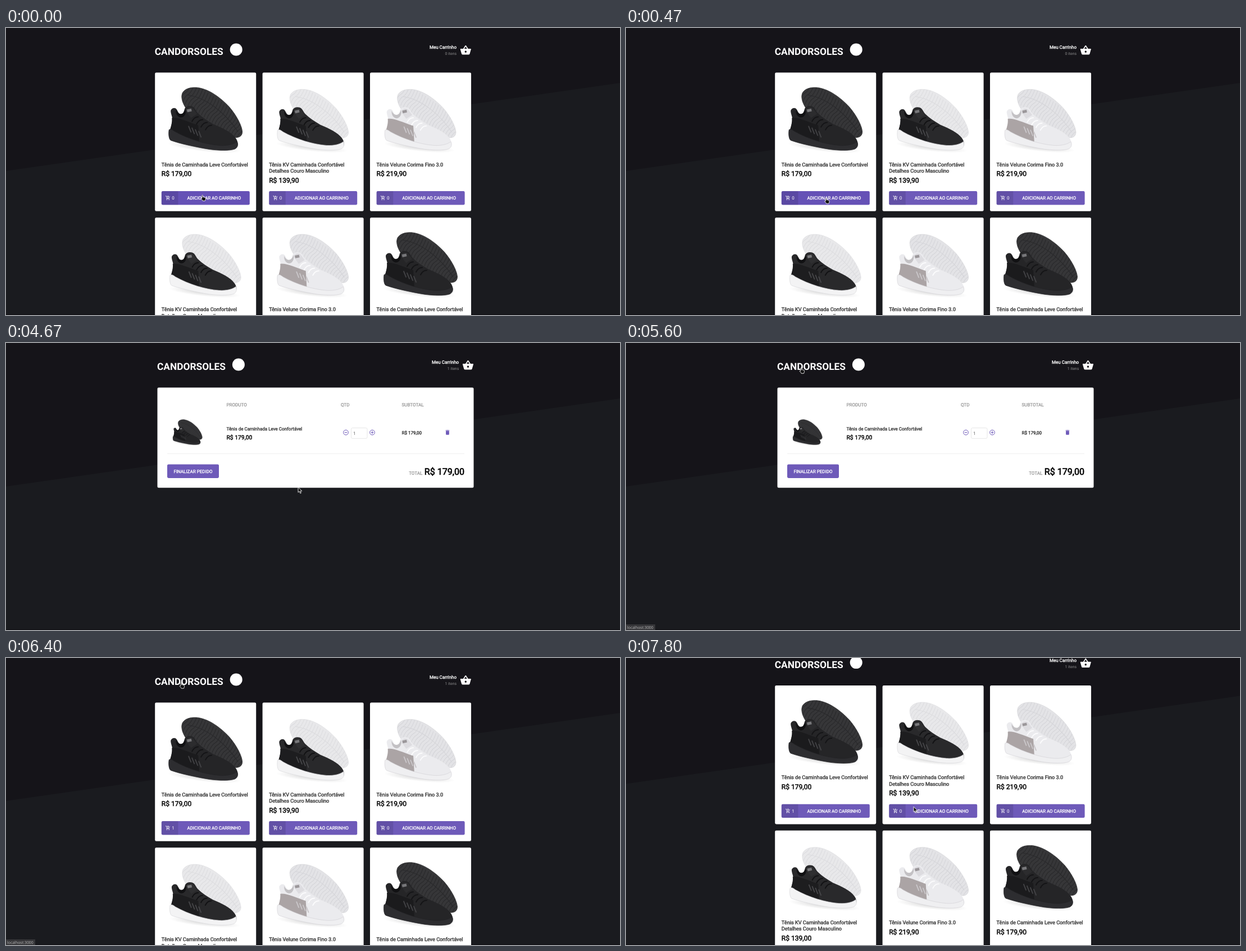
Recreate the animation shown at these times as an HTML page. Size 1093x512 px, loop 8000 ms.

```html
<!DOCTYPE html>
<html lang="pt-BR">
<head>
<meta charset="utf-8">
<title>Loja de tênis</title>
<style>
html, body { margin: 0; width: 100%; height: 100%; overflow: hidden; background: #1a1b1f; }
svg { display: block; width: 1093px; height: 512px; }
text { font-family: Roboto, Arial, sans-serif; text-rendering: geometricPrecision; white-space: pre; }
</style>
</head>
<body>
<svg id="stage" viewBox="0 0 1093 512" xmlns="http://www.w3.org/2000/svg"></svg>
<script>
const LOOP = 8000;
const PURPLE = '#6e5ab9', HOVER = '#6551b6';
const CARD = { x: 265.2, y: 79.5, w: 180, h: 247.3, dx: 191.4, dy: 258.7 };

const text = (x, y, str, size, fill, { bold = true, anchor = 'start', id = '' } = {}) =>
  `<text ${id && `id="${id}"`} x="${x}" y="${y}" font-size="${size}" fill="${fill}" text-anchor="${anchor}"` +
  (bold ? ` stroke="${fill}" stroke-width="${size * 0.04}"` : '') + `>${str}</text>`;

const rect = (x, y, w, h, fill, extra = '') =>
  `<rect x="${x}" y="${y}" width="${w}" height="${h}" fill="${fill}" ${extra}/>`;

const icon = (x, y, size, fill, d) =>
  `<path transform="translate(${x} ${y}) scale(${size / 24})" fill="${fill}" d="${d}"/>`;

const repeat = (n, fn) => Array.from({ length: n }, (_, i) => fn(i)).join('');

const ICONS = {
  basket: 'M17.2 9l-4.4-6.6a1 1 0 0 0-1.6 0L6.8 9H2a1 1 0 0 0-1 1.3l2.6 9.2A2 2 0 0 0 5.5 21h13a2 2 0 0 0 1.9-1.5L23 10.3A1 1 0 0 0 22 9zM9 9l3-4.4L15 9zm3 8a2 2 0 1 1 0-4 2 2 0 0 1 0 4z',
  add: 'M11 9h2V6h3V4h-3V1h-2v3H8v2h3zM7 18a2 2 0 1 0 0 4 2 2 0 0 0 0-4zm10 0a2 2 0 1 0 0 4 2 2 0 0 0 0-4zM7.2 14.8V14.6l.9-1.6h7.4a2 2 0 0 0 1.8-1l3.9-7L19.4 4 15.5 11h-7L4.3 2H1v2h2l3.6 7.6-1.4 2.4A2 2 0 0 0 7 17h12v-2H7.4z',
  trash: 'M6 19a2 2 0 0 0 2 2h8a2 2 0 0 0 2-2V7H6zM19 4h-3.5l-1-1h-5l-1 1H5v2h14z'
};

// Shoe outlines, in card coordinates
const SOLE = 'M54 62C48 52 46 43 49 36C54 28 65 25.5 77 27C97 30 117 45 132 61C145 76 155 95 155.5 106C155 116 146 118 134 114C105 105 70 85 54 62Z';
const UPPER = 'M28 68C29 64 34 62 37 64C40 66 41 73 46 75C50 75 52 68 53 64C56 59 64 58 69 62C72 65 73 69 76 72C84 80 94 86 104 92C120 99 136 106 143 116C147 121 148 126 147 130L140 134C110 136 60 126 26 106C28 97 31 90 31 84C31 78 28 74 28 68Z';
const QUARTER = 'M30 81C40 79 54 86 77 94L79 127C56 121 38 113 26 106C28 97 31 90 30 81Z';
const MIDSOLE = 'M25 102C28 100 31 102 35 105C60 119 90 128 115 130C130 131 142 127 146 123C149 129 147 134 142 136.5C132 140 112 139 97 137C73 133 45 127 28 121C24 118 24 107 25 102Z';
const COLLAR = 'M37 66C41 76 51 77 54 65C57 72 52 81 45 80C39 78 37 73 37 66Z';

const shoe = (id, c) => `<g id="${id}">
  <ellipse cx="88" cy="133" rx="66" ry="8" fill="url(#shade)" transform="rotate(6 88 133)"/>
  <path d="${SOLE}" fill="${c.sole}" stroke="${c.edge}" stroke-width=".8"/>
  <g clip-path="url(#soleClip)" fill="none" stroke="${c.ridge}" stroke-width="1.1">
    ${repeat(25, i => {
      const x = 44 + i * 4.8, y = 50 + i * 3.3;
      return `<path d="M${x} ${y}q4 -11 10 -14t12 -20"/>`;
    })}
    <path d="M58 40C90 44 126 72 148 106"/>
  </g>
  <path d="${UPPER}" fill="${c.upper}"/>
  <path d="${QUARTER}" fill="${c.quarter}"/>
  <path d="${COLLAR}" fill="${c.collar}"/>
  <path d="M54 67C59 60 66 61 69 66L75 74L64 81Z" fill="${c.tongue}"/>
  ${rect(57, 65, 8, 5, c.tag, 'transform="rotate(-12 61 67)"')}
  <g fill="none" stroke-linecap="round">
    ${repeat(4, i => `<path d="M${60 + i * 6} ${96 + i * 3}l4 10" stroke="${c.strap}" stroke-width="2"/>`)}
    ${repeat(4, i => `<path d="M${66 + i * 8} ${87 + i * 5}q4 -8 11 -8" stroke="${c.lace}" stroke-width="2"/>`)}
  </g>
  <path d="${MIDSOLE}" fill="${c.mid}" stroke="${c.midEdge}" stroke-width=".7"/>
</g>`;

const PALETTES = {
  black: { sole: '#363638', edge: '#303032', ridge: '#29292b', upper: '#252527', quarter: '#1b1b1d', collar: '#111113',
    tongue: '#2c2c2e', tag: '#77777a', strap: '#414144', lace: '#151517', mid: '#2d2d30', midEdge: '#222224' },
  mixed: { sole: '#e8e8ea', edge: '#dfdfe2', ridge: '#dcdcdf', upper: '#29292b', quarter: '#1d1d1f', collar: '#111113',
    tongue: '#2f2f31', tag: '#77777a', strap: '#454548', lace: '#121214', mid: '#f3f3f4', midEdge: '#d8d8db' },
  grey: { sole: '#e3e3e6', edge: '#d8d8db', ridge: '#d5d5d9', upper: '#ebebee', quarter: '#aba4a5', collar: '#c3c1c4',
    tongue: '#dddce0', tag: '#9b979a', strap: '#c9c6c9', lace: '#fbfbfc', mid: '#efeff1', midEdge: '#d3d2d6' }
};

const LEVE = ['Tênis de Caminhada Leve Confortável'];
const COURO = ['Tênis KV Caminhada Confortável', 'Detalhes Couro Masculino'];
const FINO = ['Tênis Velune Corima Fino 3.0'];
const PRODUCTS = [
  ['black', LEVE, '179,00'], ['mixed', COURO, '139,90'], ['grey', FINO, '219,90'],
  ['mixed', COURO, '139,00'], ['grey', FINO, '219,90'], ['black', LEVE, '179,90']
];

function card([kind, lines, price], i) {
  const x = CARD.x + (i % 3) * CARD.dx, y = CARD.y + Math.floor(i / 3) * CARD.dy;
  const fit = kind === 'black' ? '' : 'translate(2.6 4.2) scale(.967)';
  return `<g transform="translate(${x} ${y})">
    ${rect(0, 0, CARD.w, CARD.h, '#fff', 'rx="2.3"')}
    <use href="#${kind}" transform="${fit}"/>
    ${lines.map((s, n) => text(11.6, 167 + n * 11.5, s, 9.19, '#333')).join('')}
    ${text(11.6, 173.4 + lines.length * 11.5, 'R$ ' + price, 12.06, '#000')}
    ${rect(11.6, 211.6, 157, 24.4, PURPLE, `rx="2.3" id="buy${i}"`)}
    <path d="M41.2 211.6V236H13.9a2.3 2.3 0 0 1-2.3-2.3V213.9a2.3 2.3 0 0 1 2.3-2.3Z" fill="#000" opacity=".1"/>
    ${icon(18.5, 219.1, 9.2, '#fff', ICONS.add)}
    ${text(30.1, 226.7, '0', 8.04, '#fff', { bold: false, id: 'count' + i })}
    ${text(105.2, 226.7, 'ADICIONAR AO CARRINHO', 8.04, '#fff', { anchor: 'middle' })}
  </g>`;
}

const circleIcon = (x, plus) => `<g fill="none" stroke="${PURPLE}" stroke-width="1">
  <circle cx="${x}" cy="159.6" r="4.4"/><path d="M${x - 2.4} 159.6h4.8${plus ? 'm-2.4 -2.4v4.8' : ''}"/></g>`;

const cart = `<g id="cart">
  ${rect(269.5, 79.5, 563, 178.8, '#fff', 'rx="2.3"')}
  ${[[392.5, 'PRODUTO'], [596, 'QTD'], [704.5, 'SUBTOTAL']].map(([x, s]) => text(x, 113.4, s, 8.04, '#999')).join('')}
  <use href="#black" transform="translate(287.2 125.9) scale(.4)"/>
  ${text(392.5, 155.5, LEVE[0], 8.04, '#333')}
  ${text(392.5, 171.5, 'R$ 179,00', 10.34, '#000')}
  ${circleIcon(605)}
  ${rect(614.5, 151.5, 28.5, 18.8, '#fff', 'rx="2.3" stroke="#ddd" stroke-width=".7"')}
  ${text(618, 163.5, '1', 8, '#666', { bold: false })}
  ${circleIcon(652, true)}
  ${text(704.5, 163.3, 'R$ 179,00', 8.04, '#222')}
  ${icon(780.2, 153.7, 11.5, PURPLE, ICONS.trash)}
  ${rect(287, 197.3, 529, 0.7, '#e8e8e8')}
  ${rect(287, 216.5, 92, 24.4, PURPLE, 'rx="2.3"')}
  ${text(333, 231.6, 'FINALIZAR PEDIDO', 8.04, '#fff', { anchor: 'middle' })}
  ${text(717.2, 234.5, 'TOTAL', 8.04, '#999')}
  ${text(816, 234.6, 'R$ 179,00', 16.09, '#000', { anchor: 'end' })}
</g>`;

const header = `<g id="header">
  <text x="264.7" y="48.2" font-size="17.35" font-weight="700" fill="#fff">CANDORSOLES</text>
  <circle cx="409.7" cy="38.5" r="11" fill="#fff"/>
  ${text(802, 37.2, 'Meu Carrinho', 8.04, '#fff', { anchor: 'end' })}
  ${text(802, 48.1, '0 itens', 6.9, '#8d8d8d', { bold: false, anchor: 'end', id: 'items' })}
  ${icon(807.9, 29.3, 20.7, '#fff', ICONS.basket)}
</g>`;

const stage = document.getElementById('stage');
stage.innerHTML = `<defs>
  <radialGradient id="shade"><stop offset="0" stop-color="#000" stop-opacity=".16"/><stop offset="1" stop-color="#000" stop-opacity="0"/></radialGradient>
  <clipPath id="soleClip"><path d="${SOLE}"/></clipPath>
  ${Object.entries(PALETTES).map(([id, c]) => shoe(id, c)).join('')}
</defs>
${rect(0, 0, 1093, 512, '#1a1b1f')}
<path id="slope" d="M0 -60H1093V98L0 255Z" fill="#151419"/>
${rect(0, 510.5, 1093, 1.5, '#121216')}
<g id="page">${header}<g id="home">${PRODUCTS.map(card).join('')}</g>${cart}</g>
<g id="status">${rect(0, 502, 52, 10, '#37373a')}
  <text x="2" y="509.9" font-size="6.9" fill="#b5b5b5" style="font-family:'Noto Sans','Open Sans',sans-serif">localhost:3000</text></g>
<g id="cursor" fill="#111" stroke="#fff" stroke-width=".85" stroke-linejoin="round">
  <path id="arrow" d="M0 0V9.3L2.2 7.4L3.8 11L5.4 10.3L3.8 6.9H6.8Z"/>
  <path id="hand" d="M1.8 1.2Q2.6 -.2 3.5 1.2V4.2Q4.4 3.5 5.2 4.5Q6.1 3.9 6.8 4.9Q8.2 4.4 8.4 6V8Q8.2 9.3 7.4 10.8H3.2Q2.4 9 .3 7.2Q-.2 5.7 1.8 6.3Z"/>
</g>`;

const $ = id => document.getElementById(id);
const show = (id, on) => $(id).setAttribute('display', on ? 'inline' : 'none');
const move = (id, x, y) => $(id).setAttribute('transform', `translate(${x} ${y})`);
const at = (track, t) => track.filter(k => k[0] <= t).pop();

const POINTER = [
  [0, 'hand', 347, 297.5], [200, 'hand', 350, 300], [270, 'hand', 353.5, 302], [470, 'hand', 353.5, 302.5],
  [3600, 'arrow', 355.4, 303.2], [4200, 'arrow', 355.4, 302.5], [4470, 'arrow', 401, 299.5],
  [4670, 'arrow', 520, 257.2], [4930, 'arrow', 308.8, 57.5], [5130, 'arrow', 308.8, 48.5],
  [5330, 'hand', 309, 43.5], [7270, 'arrow', 398, 140.6], [7530, 'arrow', 509, 264.5], [7800, 'arrow', 512, 265.3]
];
const VIEW = [[0, 'home'], [3600, 'cart'], [6130, 'empty'], [6400, 'home']];
const STATUS = [[0, 0], [5330, 0.5], [5600, 1], [7530, 0.5], [7800, 0]];

function render(t) {
  const view = at(VIEW, t)[1];
  const [, shape, x, y] = at(POINTER, t);
  const home = view === 'home', added = t >= 3600;
  const scroll = t >= 7800 ? -30.4 : 0;

  show('home', home);
  show('cart', view === 'cart');
  move('header', home ? 0 : 4.2, 0);
  move('page', 0, scroll);
  move('slope', 0, scroll + (home ? 0 : 1));
  $('items').textContent = (added ? 1 : 0) + ' itens';
  $('count0').textContent = added ? 1 : 0;
  $('buy0').setAttribute('fill', added ? PURPLE : HOVER);
  $('status').setAttribute('opacity', at(STATUS, t)[1]);
  show('arrow', shape === 'arrow');
  show('hand', shape === 'hand');
  move('cursor', x, y);
}

function tick() {
  render(performance.now() % LOOP);
  requestAnimationFrame(tick);
}
tick();
</script>
</body>
</html>
```
